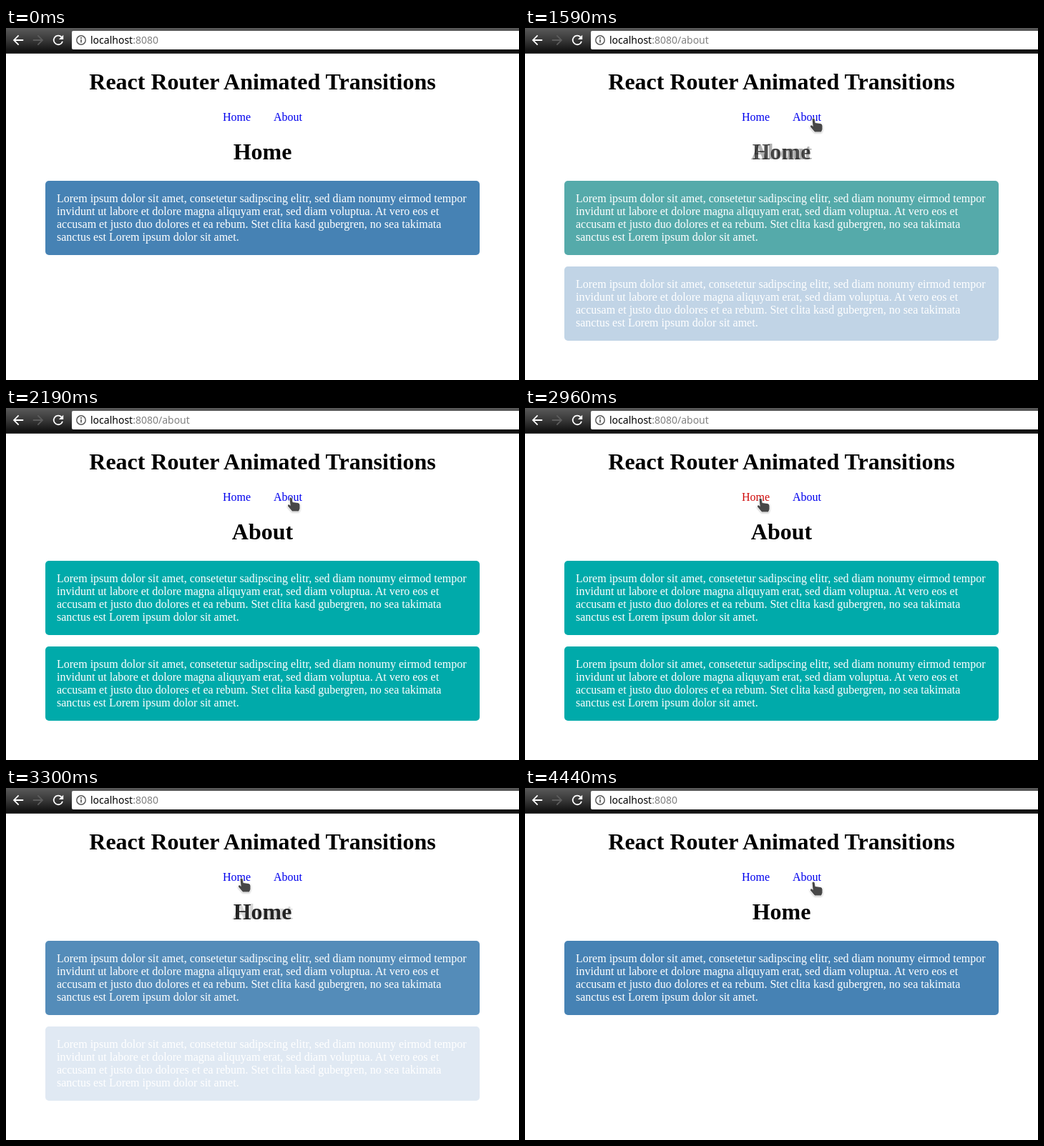
An HTML page that plays this animation: 717x493 px, repeating every 4.78 s.

```html
<!DOCTYPE html>
<html lang="en">
<head>
<meta charset="utf-8">
<title>Animated transitions</title>
<style>
  html, body { margin: 0; width: 100%; height: 100%; overflow: hidden; background: #fff; }
  body { position: relative; font: 16px/18px "Liberation Serif", serif; }
  h1, nav, .box, #bar, #url, #cursor { position: absolute; margin: 0; }
  h1 { left: 0; width: 717px; top: 57px; font-size: 32px; line-height: 36px; text-align: center; }
  h1.page { top: 155px; }
  nav { top: 116px; left: 0; width: 717px; display: flex; justify-content: center; gap: 32px; }
  .box {
    left: 55px; width: 575px; height: 72px; padding: 16px;
    border-radius: 5px; color: #fff; white-space: pre;
  }
  #first { top: 214px; }
  #second { top: 334px; }
  #bar { left: 0; top: 0; }
  #url { left: 118px; top: 7px; font: 14px/20px "Noto Sans", "Open Sans", sans-serif; color: #808080; }
  #url b { font-weight: 400; color: #000; }
  #cursor { left: 0; top: 0; overflow: visible; }
</style>
</head>
<body>
<svg id="bar" width="717" height="36">
  <defs>
    <linearGradient id="shade" x2="0" y2="1">
      <stop offset="0" stop-color="#5a5a5a"/>
      <stop offset=".5" stop-color="#363636"/>
      <stop offset=".9" stop-color="#121212"/>
      <stop offset="1" stop-color="#161616"/>
    </linearGradient>
    <path id="arrow" d="M8 -1H-4.2L1.4 -6.6L0 -8L-8 0L0 8L1.4 6.6L-4.2 1H8Z"/>
  </defs>
  <rect width="717" height="36" fill="url(#shade)"/>
  <rect y="35" width="717" height="1" fill="#3c3c3c"/>
  <rect x="92" y="4" width="630" height="26" rx="2" fill="#fff"/>
  <use href="#arrow" transform="translate(17 17) scale(.9)" fill="#fff"/>
  <use href="#arrow" transform="translate(45 17) scale(-.9 .9)" fill="#5c5c5c"/>
  <g transform="translate(73 17) scale(.9)">
    <path d="M6.7 2A7 7 0 1 1 5 -5" fill="none" stroke="#fff" stroke-width="2"/>
    <path d="M8 -8V-1H1Z" fill="#fff"/>
  </g>
  <circle cx="105" cy="17" r="6.2" fill="none" stroke="#5a5a5a" stroke-width="1.5"/>
  <path d="M105 13v2M105 16v4.5" stroke="#5a5a5a" stroke-width="1.7"/>
</svg>
<div id="url"><b>localhost</b>:8080<span id="route">/about</span></div>

<h1>React Router Animated Transitions</h1>
<nav><span id="homeLink">Home</span><span id="aboutLink">About</span></nav>
<h1 class="page" id="homeTitle">Home</h1>
<h1 class="page" id="aboutTitle">About</h1>
<div class="box" id="first"></div>
<div class="box" id="second"></div>

<svg id="cursor" width="20" height="22">
  <path d="M4.5 2.6Q6 .6 7.6 2.6L8.6 8L16 9Q18.5 9.5 18.5 12V17L17 20.5H8L2 13.6Q1.4 11 4 11.4L5.6 13Z"
    fill="#474747" stroke="#fff" stroke-width="1.6" paint-order="stroke"
    style="filter: drop-shadow(0 1px 1px rgba(0,0,0,.25))"/>
</svg>

<script>
const LOOP = 4780, FADE = 260;
const TEXT = `Lorem ipsum dolor sit amet, consetetur sadipscing elitr, sed diam nonumy eirmod tempor
invidunt ut labore et dolore magna aliquyam erat, sed diam voluptua. At vero eos et
accusam et justo duo dolores et ea rebum. Stet clita kasd gubergren, no sea takimata
sanctus est Lorem ipsum dolor sit amet.`;

// Colour stops: [opacity of the About page, red, green, blue]
const FIRST = [[0, 70, 130, 180], [.15, 84, 139, 185], [.3, 85, 170, 170], [.8, 85, 170, 170], [1, 0, 170, 170]];
const SECOND = [[0, 255, 255, 255], [.46, 163, 190, 218], [.62, 96, 147, 191], [.8, 85, 170, 170], [1, 0, 170, 170]];

const el = id => document.getElementById(id);
const clamp = v => Math.min(1, Math.max(0, v));
const mix = (a, b, p) => a + (b - a) * p;
const smooth = p => p * p * (3 - 2 * p);
const within = (t, from, to) => t >= from && t < to;

function colorAt(stops, p) {
  const i = Math.max(1, stops.findIndex(s => s[0] >= p));
  const [a, b] = [stops[i - 1], stops[i]];
  const q = (p - a[0]) / (b[0] - a[0]);
  return `rgb(${[1, 2, 3].map(k => Math.round(mix(a[k], b[k], q)))})`;
}

// Share of the About page that is visible, refreshed every 40 ms
function aboutShare(t) {
  const since = start => Math.floor((t - start) / 40) * 40;
  return t < 3100
    ? clamp(since(1510) / FADE)
    : 1 - clamp((since(3100) + 20) / FADE);
}

function glide(t, start, from, to) {
  const p = smooth(clamp((Math.floor((t - start) / 41) + 1) / 9));
  return [0, 1].map(k => Math.round(mix(from[k], to[k], p)));
}

function cursorAt(t) {
  if (t < 2190) return [397, 125];
  if (t < 2730) return glide(t, 2320, [392, 124], [324, 126]);
  if (t < 3910) return [323, 125];
  if (t < 4440) return glide(t, 4040, [323, 126], [397, 132]);
  return [397, 130];
}

function draw(t) {
  const share = aboutShare(t);
  el("first").style.background = colorAt(FIRST, share);
  el("second").style.background = colorAt(SECOND, share);
  el("homeTitle").style.opacity = 1 - share;
  el("aboutTitle").style.opacity = share;
  el("route").hidden = !within(t, 1510, 3100);
  const linkColor = pressed => pressed ? "#d00a0a" : "#0000ee";
  el("aboutLink").style.color = linkColor(within(t, 1450, 1510));
  el("homeLink").style.color = linkColor(within(t, 2960, 3100));
  const [x, y] = cursorAt(t);
  el("cursor").style.transform = `translate(${x}px, ${y}px)`;
  el("cursor").style.visibility = t < 1510 ? "hidden" : "visible";
}

el("first").textContent = el("second").textContent = TEXT;
const begin = performance.now();
function tick() {
  draw((performance.now() - begin) % LOOP);
  requestAnimationFrame(tick);
}
tick();
</script>
</body>
</html>
```
